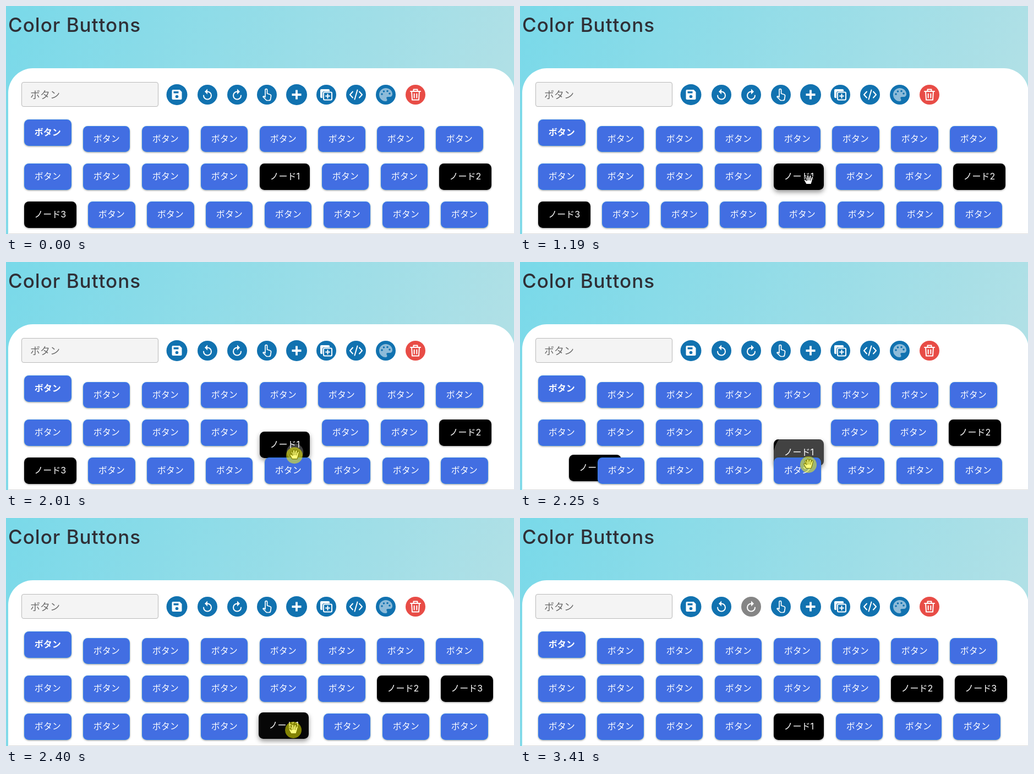
An HTML page that plays this animation: 923x414 px, repeating every 4.53 s.

```html
<!DOCTYPE html>
<html lang="ja">
<head>
<meta charset="utf-8">
<title>Color Buttons</title>
<style>
  html, body { margin: 0; width: 100%; height: 100%; overflow: hidden; }
  svg { display: block; width: 100%; height: 100%; }
  text { font-family: Inter, "Noto Sans CJK JP", "Noto Sans CJK", sans-serif; }
  .title { font-size: 35px; font-weight: 500; letter-spacing: 1px; fill: #2f2f36; }
  .field { font-size: 18px; font-weight: 300; fill: #6a6a6a; }
  .btn text { font-size: 16px; fill: #fff; text-anchor: middle; }
  .btn .face { filter: drop-shadow(0 1.5px 1.5px rgba(0,0,0,.4)); }
  .btn.up .face { filter: drop-shadow(0 4px 4px rgba(0,0,0,.42)); }
  .icon { fill: none; stroke: #fff; stroke-width: 2; stroke-linecap: round; stroke-linejoin: round; }
  .icon .solid { fill: #fff; stroke: none; }
  .icon .hole { fill: #1172b0; stroke: none; }
  .icon .dots { stroke: #1172b0; stroke-width: 3.6; }
</style>
</head>
<body>
<svg viewBox="0 0 923 414" preserveAspectRatio="none">
  <defs>
    <linearGradient id="sky" gradientUnits="userSpaceOnUse" x1="0" y1="0" x2="830" y2="330">
      <stop offset="0" stop-color="#79d9e9"/>
      <stop offset="1" stop-color="#b0e0e6"/>
    </linearGradient>
    <clipPath id="nodeClip"><rect width="91" height="48" rx="8"/></clipPath>
  </defs>
  <rect width="923" height="414" fill="url(#sky)"/>
  <text class="title" x="4" y="47">Color Buttons</text>
  <rect x="4" y="113" width="920" height="400" rx="45" fill="#fff"/>
  <path d="M5 413.5H923" stroke="#dcdcdc"/>
  <rect x="28.5" y="138.5" width="248" height="44" rx="3.5" fill="#f4f4f4" stroke="#b9b9b9"/>
  <text class="field" x="44" y="168">ボタン</text>
  <g id="tools"></g>
  <g id="buttons"></g>
  <g id="hand">
    <path d="M-4 8.5L-8 1.5Q-8-1-5.5 0L-3.5 2L-6-4Q-5.5-6.5-3.5-5L-2.5-2V-7Q-1-9.5 .5-7.5L1-3L2-7Q3.5-9 5-6.5L4.500-2L6-5Q8-6.5 8.5-4L6.5 4L5 8.5z" fill="#fff" stroke="#000" stroke-width="1.2" stroke-linejoin="round"/>
    <path d="M-2.5-2L-1.5 2M1-3V1.5M4.5-2L3.5 2" stroke="#000" fill="none"/>
  </g>
  <path id="arrow" d="M.5 .5V15.5L4 12.3L6.3 18L8.6 17L6.3 11.5H10.8z" fill="#fff" stroke="#000"/>
  <circle id="press" r="15" fill="#ff0" fill-opacity=".5"/>
</svg>
<script>
const NS = 'http://www.w3.org/2000/svg';
const LOOP = 4530, COLS = 8, COUNT = 24, NODE = 12;
const LEFT = 33.2, TOP = 217.7, GAP = 21.5, PITCH = 68.7, H = 47.6;
const $ = id => document.getElementById(id);

function add(parent, tag, attrs = {}, text) {
  const el = document.createElementNS(NS, tag);
  for (const k in attrs) el.setAttribute(k, attrs[k]);
  if (text) el.textContent = text;
  return parent.appendChild(el);
}
const place = (el, x, y) => el.setAttribute('transform', `translate(${x} ${y})`);
const show = (el, on) => el.setAttribute('visibility', on ? 'visible' : 'hidden');
const mix = (a, b, p) => a + (b - a) * p;
const ramp = (t, a, b) => Math.min(1, Math.max(0, (t - a) / (b - a)));
const easeOut = (t, a, b) => 1 - (1 - ramp(t, a, b)) ** 2;
const smooth = (t, a, b) => { const p = ramp(t, a, b); return p * p * (3 - 2 * p); };

// Toolbar, evenly spaced
const turn = '<path d="M0-5.5A7 7 0 1 1-7 1.5"/><path class="solid" d="M0-10.5V-.5L-5-5.5z"/>';
const icons = {
  save: '<path class="solid" d="M-9-7Q-9-9-7-9H5L9-5V7Q9 9 7 9H-7Q-9 9-9 7z"/><path class="hole" d="M-6-6H3V-2.5H-6z"/><circle class="hole" cy="3.5" r="2.8"/>',
  undo: turn,
  redo: `<g transform="scale(-1 1)">${turn}</g>`,
  point: '<path stroke-width="1.7" d="M-3 3V-8.5A1.8 1.8 0 0 1 .6-8.5V-2L6-.2Q8 .6 7.5 3L6.6 8Q6.2 10.5 4 10.5H-.5L-7 4Q-6.5 1.5-3 4.5"/>',
  plus: '<path stroke-width="3.8" d="M-8.5 0H8.5M0-8.5V8.5" stroke-linecap="butt"/>',
  copy: '<rect class="solid" x="-11" y="-10" width="17" height="16" rx="2"/><rect class="hole" x="-7" y="-6" width="18" height="17" rx="3"/><rect x="-5" y="-4.5" width="15" height="14" rx="2"/><path d="M-1 2.5H6M2.5-1V6"/>',
  code: '<path d="M-6-5.5L-11 0L-6 5.5M6-5.5L11 0L6 5.5M2.5-8.5L-2.5 8.5"/>',
  palette: '<path class="solid" opacity=".52" d="M0-12A12 12 0 1 0 0 12C3 12 2.8 9 1.8 7.5C.5 5 2 4 4 4H7C10 4 12 2 12-1C12-7 7-12 0-12z"/><path class="dots" d="M-7-1h0M-3.5-6h0M3-6.5h0M7-2h0"/>',
  trash: '<path d="M-9-6H9M-3.5-6V-9.5H3.5V-6M-7-6L-6 9.5H6L7-6M-2.3-1.5V5.5M2.3-1.5V5.5"/>'
};
const discs = {};
Object.entries(icons).forEach(([name, art], i) => {
  const g = add($('tools'), 'g', { class: 'icon' });
  place(g, i ? 312 + 54 * i : 310.5, 161);
  discs[name] = add(g, 'circle', { r: i % 4 || i > 4 ? 18 : 19, fill: name === 'trash' ? '#e84c46' : '#1172b0', stroke: 'none' });
  add(g, 'g').innerHTML = art;
});

// Button grid
const nodes = { 12: 'ノード1', 15: 'ノード2', 16: 'ノード3' };
const width = i => i === NODE ? 91.6 : nodes[i] ? 94.6 : 85.35;
const before = Array.from({ length: COUNT }, (_, i) => i);
const after = before.filter(i => i !== NODE);
after.splice(20, 0, NODE);

function flow(order) {
  const spots = [];
  let x;
  order.forEach((id, n) => {
    if (n % COLS === 0) x = LEFT;
    spots[id] = { x, y: TOP + PITCH * Math.floor(n / COLS) - (id ? 0 : 11.6) };
    x += width(id) + GAP;
  });
  return spots;
}
const from = flow(before), to = flow(after);

const buttons = [];
let ripple;
// Nodes lie beneath the plain buttons
[...Object.keys(nodes).map(Number), ...before.filter(i => !nodes[i])].forEach(i => {
  const w = width(i), name = nodes[i];
  const g = add($('buttons'), 'g', { class: 'btn' });
  const face = add(g, 'rect', { class: 'face', rx: 8.5, fill: name ? '#000' : '#2f86ec' });
  const inner = add(g, 'rect', { x: .8, y: .8, rx: 7.8, fill: name ? '#000' : '#426ee2' });
  if (i === NODE) {
    const clip = add(g, 'g', { 'clip-path': 'url(#nodeClip)' });
    ripple = add(clip, 'circle', { cx: 64, cy: 37, fill: '#fff' });
  }
  add(g, 'text', { x: w / 2, y: 29, 'font-weight': i ? 400 : 700 }, name || 'ボタン');
  buttons[i] = { g, face, inner, w };
});

// Boxes sit on whole pixels
function setBox(b, x, y) {
  b.x = Math.round(x);
  b.y = Math.round(y);
  b.right = Math.round(x + b.w);
  b.bottom = Math.round(y + H);
  place(b.g, b.x, b.y);
  [[b.face, 0], [b.inner, 1.6]].forEach(([rect, inset]) => {
    rect.setAttribute('width', b.right - b.x - inset);
    rect.setAttribute('height', b.bottom - b.y - inset);
  });
}
const covers = (b, x, y) => x >= b.x && x < b.right && y >= b.y && y < b.bottom;

// The screen refreshes every 100 ms from the start of each phase
const phases = [0, 280, 890, 1800, 1960, 2250, 2300, 2400, 2800, 3410];
function refresh(time) {
  const start = phases.filter(p => p <= time).pop();
  return start + Math.floor((time - start) / 100) * 100;
}

function draw(time) {
  const t = refresh(time);
  const drag = easeOut(t, 1900, 2060), drop = easeOut(t, 2250, 2400);
  const slide = smooth(t, 2220, 2400), settle = smooth(t, 2700, 2900);
  const lift = 2 * (drop - ramp(t, 2700, 2800));

  buttons.forEach((b, i) => {
    const a = from[i], z = to[i];
    const p = i === NODE ? mix(.52 * drag, 1, drop) : i > 20 ? settle : slide;
    const off = i === NODE ? lift : 0;
    setBox(b, mix(a.x, z.x, p) - off, mix(a.y, z.y, p) - off);
  });

  const enter = easeOut(t, 280, 790), aim = easeOut(t, 790, 1190), leave = smooth(t, 2700, 3310);
  const x = 758 - 185 * enter - 49 * aim - 2 * drop + 14 * leave;
  const y = 404 - 70 * enter - 19 * aim + 8 * ramp(t, 1790, 1800) + 43 * drag + 17 * drop + 45 * leave;
  const visible = t >= 280 && t < 3300;
  const over = buttons.some(b => covers(b, x, y));
  show($('hand'), visible && over);
  show($('arrow'), visible && !over);
  show($('press'), t >= 1800 && t < 2800);
  place($('hand'), x, y);
  place($('arrow'), x, y);
  place($('press'), x, y + 2);

  const node = buttons[NODE];
  node.g.setAttribute('class', visible && covers(node, x, y) ? 'btn up' : 'btn');
  ripple.setAttribute('r', 80 * easeOut(t, 1900, 2500));
  ripple.setAttribute('opacity', .26 * (1 - easeOut(t, 2280, 2460)));
  discs.redo.setAttribute('fill', t >= 2800 ? '#858585' : '#1172b0');
}

function loop() {
  draw(performance.now() % LOOP);
  requestAnimationFrame(loop);
}
loop();
</script>
</body>
</html>
```
